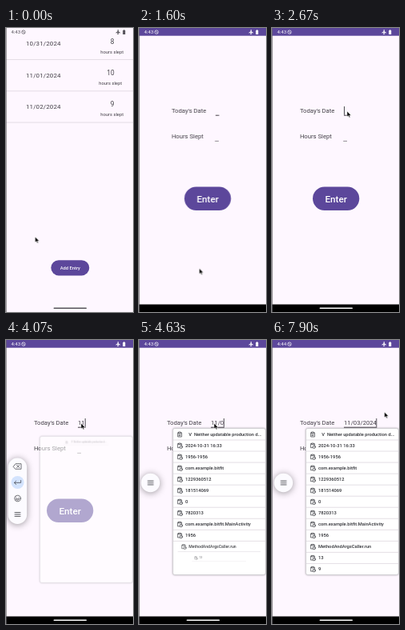
An HTML page that plays this animation: 159x355 px, repeating every 8000 ms.

```html
<!DOCTYPE html>
<html lang="en">
<head>
<meta charset="utf-8">
<title>Sleep log</title>
<style>
  @property --w { syntax: "<length>"; inherits: true; initial-value: 0px; }
  html, body { margin: 0; width: 100%; height: 100%; overflow: hidden; background: #fef7ff; }
  svg { display: block; width: 100vw; height: 100vh; }
  text { font-family: Roboto, sans-serif; fill: #434047; }
  .mid { text-anchor: middle; }
  .date { font-size: 7.9px; letter-spacing: .02em; }
  .num { font-size: 8.3px; }
  .small { font-size: 5.8px; }
  .label { font-size: 7.7px; }
  .typed { font-size: 7.7px; }
  .button { font-weight: 500; fill: #fff; }
  .purple { fill: #5c479b; }
  .line { stroke: #d9d2da; stroke-width: .7; }
  .icon { fill: none; stroke: #45464b; stroke-width: .75; stroke-linejoin: round; stroke-linecap: round; }

  /* One loop is 8000 ms, so 1% is 80 ms. */
  #cursor, #ripple, #list, #entry, #content, #status, #handle, #old, #new,
  #field, #caret, #toolbar, #pill, #keys, #menu, #popup, .row { animation: 8s linear infinite both; }

  #cursor { animation-name: cursor; }
  @keyframes cursor {
    0%, 2.125% { transform: translate(36.5px, 261px); animation-timing-function: ease-in-out; }
    12.125%, 22.875% { transform: translate(75.5px, 300.5px); animation-timing-function: ease-in-out; }
    32.875%, 83.375% { transform: translate(94px, 104px); animation-timing-function: ease-in-out; }
    95%, 100% { transform: translate(140.7px, 90px); }
  }

  #ripple { animation-name: ripple; }
  @keyframes ripple {
    0%, 15% { transform: scale(0); opacity: .2; animation-timing-function: ease-out; }
    18% { transform: scale(1); opacity: .16; }
    20%, 100% { transform: scale(1); opacity: 0; }
  }

  #list { animation-name: list; }
  @keyframes list {
    0%, 18.375% { transform: none; animation-timing-function: cubic-bezier(.2, .6, .2, 1); }
    24%, 100% { transform: translateX(-16px); }
  }
  #entry { animation-name: entry; }
  @keyframes entry { 0%, 18.9% { opacity: 0 } 19.6%, 100% { opacity: 1 } }
  #content { animation-name: content; }
  @keyframes content {
    0%, 18.375% { transform: translateX(16px); animation-timing-function: cubic-bezier(.3, .5, .4, 1); }
    23%, 100% { transform: none; }
  }
  #status { animation-name: status; }
  @keyframes status { 0%, 18.9% { color: #504d54 } 19.6%, 100% { color: #fff } }
  #status text { font-size: 6px; fill: currentColor; }
  #handle { animation-name: handle; }
  @keyframes handle { 0%, 18.9% { fill: #57545a } 19.6%, 22.875% { fill: #000 } 27%, 100% { fill: #fff } }
  #old { animation-name: old; }
  @keyframes old { 0%, 83.374% { opacity: 1 } 83.375%, 100% { opacity: 0 } }
  #new { animation-name: new; }
  @keyframes new { 0%, 83.374% { opacity: 0 } 83.375%, 100% { opacity: 1 } }

  /* --w is the width of the text typed so far. */
  #field { animation-name: typing; animation-timing-function: step-end; }
  @keyframes typing {
    0% { --w: 0px } 43.75% { --w: 4.3px } 45.375% { --w: 8.7px } 52.1% { --w: 11.5px }
    56.6% { --w: 15.8px } 65.875% { --w: 20.1px } 70.875% { --w: 23px } 76.25% { --w: 27.3px }
    77.5% { --w: 31.6px } 79.1% { --w: 36px } 81.25%, 100% { --w: 40.3px }
  }
  #typedClip { width: var(--w); }
  #underline { width: max(4.5px, calc(var(--w) + 1px)); }
  #caretPos { transform: translateX(var(--w)); }
  #caret { animation-name: blink; animation-timing-function: step-end; }
  @keyframes blink {
    0% { opacity: 0 } 33.375% { opacity: 1 } 38.375% { opacity: 0 } 43.75% { opacity: 1 }
    62.875% { opacity: 0 } 65.875% { opacity: 1 } 87.5% { opacity: 0 } 93.75%, 100% { opacity: 1 }
  }

  #toolbar { animation-name: toolbar; filter: drop-shadow(0 1.5px 4.5px #0006); }
  @keyframes toolbar {
    0%, 33.375% { transform: translateX(-36px); opacity: 0; animation-timing-function: ease-out; }
    38.375%, 100% { transform: none; opacity: 1; }
  }
  #pill { animation-name: pill; }
  @keyframes pill {
    0%, 51% { y: 147.5px; height: 82.5px; animation-timing-function: ease-in-out; }
    55.5%, 100% { y: 166.8px; height: 23.5px; }
  }
  #keys { animation-name: keys; }
  @keyframes keys { 0%, 51% { opacity: 1 } 53%, 100% { opacity: 0 } }
  #menu { animation-name: menu; }
  @keyframes menu {
    0%, 51% { transform: translate(14.5px, 218px); animation-timing-function: ease-in-out; }
    55.5%, 100% { transform: translate(14.5px, 178.5px); }
  }

  #popup { animation-name: popup; }
  @keyframes popup {
    0%, 50% { transform: translateY(16px); opacity: 0; }
    50.875% { transform: translateY(10px); opacity: .52; }
    52.5%, 100% { transform: none; opacity: 1; }
  }
  #card { fill: #fff; stroke: #c8c6ca; stroke-width: .7; filter: drop-shadow(0 .8px 1.2px #0005); }
  .row { animation-name: row; animation-delay: calc(var(--i) * 50ms); transform-origin: 100px var(--y); }
  @keyframes row {
    0%, 50.375% { transform: scale(0); opacity: 0; animation-timing-function: cubic-bezier(.25, .46, .45, .94); }
    52.25%, 100% { transform: none; opacity: 1; }
  }
  .row text { font-size: 5.75px; font-weight: 500; fill: #303136; white-space: pre; }
</style>
</head>
<body>
<svg viewBox="0 0 159 355" preserveAspectRatio="none">
  <defs>
    <clipPath id="addShape"><rect x="56.3" y="290.2" width="48" height="19.2" rx="9.6"/></clipPath>
    <g id="clipboard" class="icon">
      <path d="M-1.2-2.2H-2.4V3H2.4V-2.2H1.2M-1.2-3H1.2V-1.3H-1.2ZM-1 .2H1M-1 1.6H.6"/>
    </g>
    <g id="clipClock" class="icon">
      <path d="M-1.2-2.4H-2.6V2.6H2.4V-2.4H1.2M-1.2-3H1.2V-1.5H-1.2Z"/>
      <circle cx="1.7" cy="1.6" r="1.8" style="fill:#fff"/>
      <path d="M1.7.7V1.7H2.4" style="stroke-width:.5"/>
    </g>
  </defs>

  <rect width="159" height="355" fill="#fef7ff"/>
  <g id="list">
    <g id="days"></g>
    <rect x="56.3" y="290.2" width="48" height="19.2" rx="9.6" class="purple"/>
    <g clip-path="url(#addShape)" fill="#fff">
      <circle id="ripple" cx="80.5" cy="300" r="26" style="transform-origin:80.5px 300px"/>
    </g>
    <text x="80.3" y="302" class="mid small button">Add Entry</text>
  </g>

  <g id="entry">
    <rect width="159" height="355" fill="#fef7ff"/>
    <rect width="159" height="9.7" class="purple"/>
    <rect y="345.5" width="159" height="9.5"/>
    <g id="content">
      <text x="34.9" y="106.1" class="label">Today's Date</text>
      <text x="34.9" y="138" class="label">Hours Slept</text>
      <rect x="89.2" y="140.9" width="4.8" height=".8" fill="#77737a"/>
      <g id="field">
        <clipPath id="typedPart"><rect id="typedClip" x="90" y="96" height="16"/></clipPath>
        <text x="90" y="106.1" class="typed" clip-path="url(#typedPart)">11/03/2024</text>
        <rect id="underline" x="90" y="108.7" height="1" fill="#454148"/>
        <g id="caretPos"><rect id="caret" x="90" y="98" width=".9" height="10.7" fill="#3c3941"/></g>
      </g>
      <rect x="51" y="198.5" width="58.3" height="29.6" rx="14.8" class="purple"/>
      <text x="80.2" y="217.5" class="mid button" font-size="11.7">Enter</text>
    </g>
  </g>

  <g id="status" fill="currentColor">
    <g id="old"><text x="6.5" y="7.1">4:43</text></g>
    <g id="new"><text x="6.5" y="7.1">4:44</text></g>
    <path d="M20.3 3.5 23.5 6.7M24.1 5.1a2.2 2.2 0 1 1-4.4 0 2.2 2.2 0 1 1 4.4 0Z" fill="none" stroke="currentColor" stroke-width=".7"/>
    <path d="M139.7 2.2q.6-.6 1.1 0V4.2L143 5.7V6.5L140.8 5.8V7.1L141.4 7.7V8.1L140.2 7.7 139 8.1V7.7L139.7 7.1V5.8L137.5 6.5V5.7L139.7 4.2Z"/>
    <path d="M146.3 2.9H147.1V2.2H148.5V2.9H149.3V7.9H146.3Z"/>
  </g>
  <rect id="handle" x="59.5" y="349.4" width="41.5" height="1.5" rx=".75"/>

  <g id="popup">
    <rect id="card" x="42.4" y="110.5" width="116" height="183" rx="2.5"/>
    <g id="rows"></g>
  </g>

  <g id="toolbar">
    <rect id="pill" x="2.6" width="23.5" rx="11.7" fill="#fcfbff"/>
    <g id="keys" class="icon">
      <path d="M9.3 158 12 154.7H19V161.3H12ZM13.6 156.4 16.8 159.6M16.8 156.4 13.6 159.6"/>
      <circle cx="14.5" cy="178" r="8" fill="#d3e3fd" stroke="none"/>
      <path d="M18.6 175.5V178.4H10.4M12.6 176.2 10.4 178.4 12.6 180.6"/>
      <circle cx="14.5" cy="198" r="3.8"/>
      <path d="M12.4 199q2.1 2.7 4.2 0ZM13 196.7v.2M16 196.7v.2"/>
    </g>
    <path id="menu" class="icon" style="stroke-width:.9" d="M-3.4-2.4H3.4M-3.4 0H3.4M-3.4 2.4H3.4"/>
  </g>

  <rect width=".6" height="355" fill="#66636a"/>
  <path id="cursor" d="M0 0V7L1.6 5.6 2.7 8.1 3.9 7.6 2.8 5.2H5Z" fill="#000" stroke="#fff" stroke-width=".5"/>
</svg>
<script>
  const days = [["10/31/2024", 8, 133], ["11/01/2024", 10, 131], ["11/02/2024", 9, 133]];
  document.getElementById("days").innerHTML = days.map(([date, hours, x], i) => `
    <g transform="translate(0 ${i * 39.3})">
      <text x="25" y="22.4" class="date">${date}</text>
      <text x="${x}" y="19.6" class="mid num">${hours}</text>
      <text x="${x - .3}" y="31.6" class="mid small">hours slept</text>
      <path d="M0 39.5H159" class="line"/>
    </g>`).join("");

  const clips = ["V  Neither updatable production d...", "2024-10-31 16:33", "1956-1956", "com.example.bitfit",
    "1229360512", "181514069", "0", "7820313", "com.example.bitfit.MainActivity", "1956",
    "MethodAndArgsCaller.run", "13", "9"];
  document.getElementById("rows").innerHTML = clips.map((clip, i) => {
    const y = 118 + i * 14.04;
    const last = i === clips.length - 1;
    return `<g class="row" style="--i:${i};--y:${y}px">
      <use href="#${i ? "clipClock" : "clipboard"}" x="51" y="${y}"/>
      <text x="${i ? 57.9 : 62.3}" y="${y + 1.7}">${clip}</text>
      ${last ? "" : `<path d="M42.8 ${y + 7}H158" class="line"/>`}
    </g>`;
  }).join("");
</script>
</body>
</html>
```
